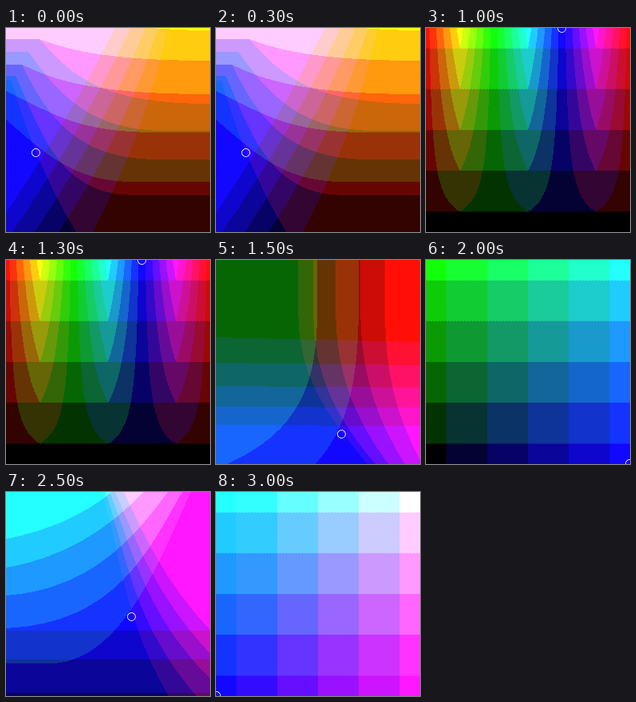
Recreate the animation shown at these times as an HTML page without scripts. Size 256x256 px, loop 3.5 s.

```html
<!DOCTYPE html>
<html lang="en">
<head>
<meta charset="utf-8">
<title>Colour space slices</title>
<style>
html, body { margin: 0; width: 100%; height: 100%; overflow: hidden; background: #000; }
main { position: relative; width: 256px; height: 256px; overflow: hidden; filter: url(#websafe); }
.slice {
  position: absolute; inset: 0; overflow: hidden; isolation: isolate;
  background: #000; background-blend-mode: screen;
  visibility: hidden; animation: show 3.5s step-end calc(var(--i) * .5s) infinite;
}
/* picker ring */
.slice::after {
  content: ""; position: absolute; box-sizing: border-box;
  left: calc(var(--x) * 1px - 5px); top: calc(var(--y) * 1px - 5px);
  width: 11px; height: 11px; border: 1px solid #fff; border-radius: 50%;
}
.slice svg { position: absolute; inset: 0; shape-rendering: crispEdges; }
.slice path { mix-blend-mode: plus-lighter; }
.r { fill: #300; } .g { fill: #030; } .b { fill: #003; }

.red-blue { background-image: linear-gradient(to top, #000, #f00), linear-gradient(to right, #000, #00f); }
.green-blue { background-image: linear-gradient(to top, #000, #0f0), linear-gradient(to right, #000, #00f); }
.green-red { background: linear-gradient(to top, #000, #0f0), linear-gradient(to right, #000, #f00), #00f; background-blend-mode: screen; }
.hue {
  background: linear-gradient(#fff, #000), linear-gradient(to right, #f00, #ff0, #0f0, #0ff, #00f, #f0f, #f00), #fff;
  background-blend-mode: multiply;
}
@keyframes show { 0% { visibility: visible; } 14.28571%, 100% { visibility: hidden; } }
</style>
</head>
<body>
<svg width="0" height="0" style="position:absolute">
  <!-- round each channel to six levels, then lift the pure primaries -->
  <filter id="websafe" x="0" y="0" width="100%" height="100%" color-interpolation-filters="sRGB">
    <feComponentTransfer result="steps">
      <feFuncR type="discrete" tableValues="0 .2 .2 .4 .4 .6 .6 .8 .8 1"/>
      <feFuncG type="discrete" tableValues="0 .2 .2 .4 .4 .6 .6 .8 .8 1"/>
      <feFuncB type="discrete" tableValues="0 .2 .2 .4 .4 .6 .6 .8 .8 1"/>
    </feComponentTransfer>
    <feColorMatrix values="0 .07 .07 0 0  .06 0 .03 0 0  .03 .04 0 0 0  0 0 0 1 0"/>
    <feBlend in2="steps" mode="lighten"/>
  </filter>
</svg>
<main>
  <!-- Lab, a fixed: b across, L up; each path adds one level to a channel -->
  <div class="slice" style="--i:0;--x:37;--y:156">
    <svg width="256" height="256">
      <g class="r">
        <path d="M0 0V14H42C85 64 125 95 256 95V0z"/>
        <path d="M0 0V30H28C65 82 105 129 200 129H256V0z"/>
        <path d="M0 0V46H20C52 112 90 165 190 165H256V0z"/>
        <path d="M0 0V60H12C40 118 62 210 160 210H256V0z"/>
        <path d="M0 0V66H7C22 120 48 190 88 256H256V0z"/>
      </g>
      <g class="g">
        <path d="M182 0Q220 3 256 3V0z"/>
        <path d="M0 0V14H42C80 28 130 41 256 41V0z"/>
        <path d="M0 0V46H20C62 66 110 83 256 83V0z"/>
        <path d="M0 0V79C60 108 90 131 190 131H256V0z"/>
        <path d="M0 0V115C50 158 85 193 160 193H256V0z"/>
      </g>
      <g class="b">
        <path d="M0 0H137Q72 128 -16 256z"/>
        <path d="M0 0H156Q96 128 8 256H0z"/>
        <path d="M0 0H175Q122 128 36 256H0z"/>
        <path d="M0 0H191Q151 128 66 256H0z"/>
        <path d="M0 0H203Q176 128 109 256H0z"/>
      </g>
    </svg>
  </div>
  <div class="slice red-blue" style="--i:1;--x:255;--y:255"></div>
  <div class="slice hue" style="--i:2;--x:170;--y:0"></div>
  <!-- Lab, L fixed: a across, b up -->
  <div class="slice" style="--i:3;--x:157;--y:218">
    <svg width="256" height="256">
      <g class="r">
        <path d="M103 0V65C104 145 135 190 190 256H256V0z"/>
        <path d="M122 0V65C122 145 152 200 200 256H256V0z"/>
        <path d="M150 0V65C151 145 175 200 216 256H256V0z"/>
        <path d="M181 0V65C182 145 204 205 237 256H256V0z"/>
        <path d="M212 0V65C212 145 228 200 259 256V0z"/>
      </g>
      <g class="g">
        <path d="M0 0H127V65C127 155 105 215 14 256H0z"/>
        <path d="M0 0H179V65C178 150 167 210 125 256H0z"/>
      </g>
      <g class="b">
        <path d="M0 97L256 103V256H0z"/>
        <path d="M0 129L256 132V256H0z"/>
        <path d="M0 158L256 160V256H0z"/>
        <path d="M0 184L256 185V256H0z"/>
        <path d="M0 207L256 208V256H0z"/>
      </g>
    </svg>
  </div>
  <div class="slice green-blue" style="--i:4;--x:255;--y:255"></div>
  <!-- Lab, b fixed: a across, L up -->
  <div class="slice" style="--i:5;--x:157;--y:156">
    <svg width="256" height="256">
      <g class="r">
        <path d="M121 0C145 85 150 165 204 256H256V0z"/>
        <path d="M125 0C153 85 160 165 239 256H256V0z"/>
        <path d="M130 0C158 70 175 155 258 236V0z"/>
        <path d="M137 0C163 60 187 130 257 204V0z"/>
        <path d="M148 0C171 50 200 115 256 173V0z"/>
      </g>
      <g class="g">
        <path d="M0 0H133Q80 43 0 59z"/>
        <path d="M0 0H172C128 48 70 83 0 95z"/>
        <path d="M0 0H203C158 62 103 122 0 130z"/>
        <path d="M0 0H221C180 72 138 165 0 171z"/>
        <path d="M0 0H232C193 85 147 208 62 215H0z"/>
      </g>
      <g class="b">
        <path d="M0 0H256V174H0z"/>
        <path d="M0 0H256V210H0z"/>
        <path d="M0 0H256V252H0z"/>
        <path d="M0 0H256V256H0z"/>
        <path d="M0 0H256V256H0z"/>
      </g>
    </svg>
  </div>
  <div class="slice green-red" style="--i:6;--x:0;--y:255"></div>
</main>
</body>
</html>
```
